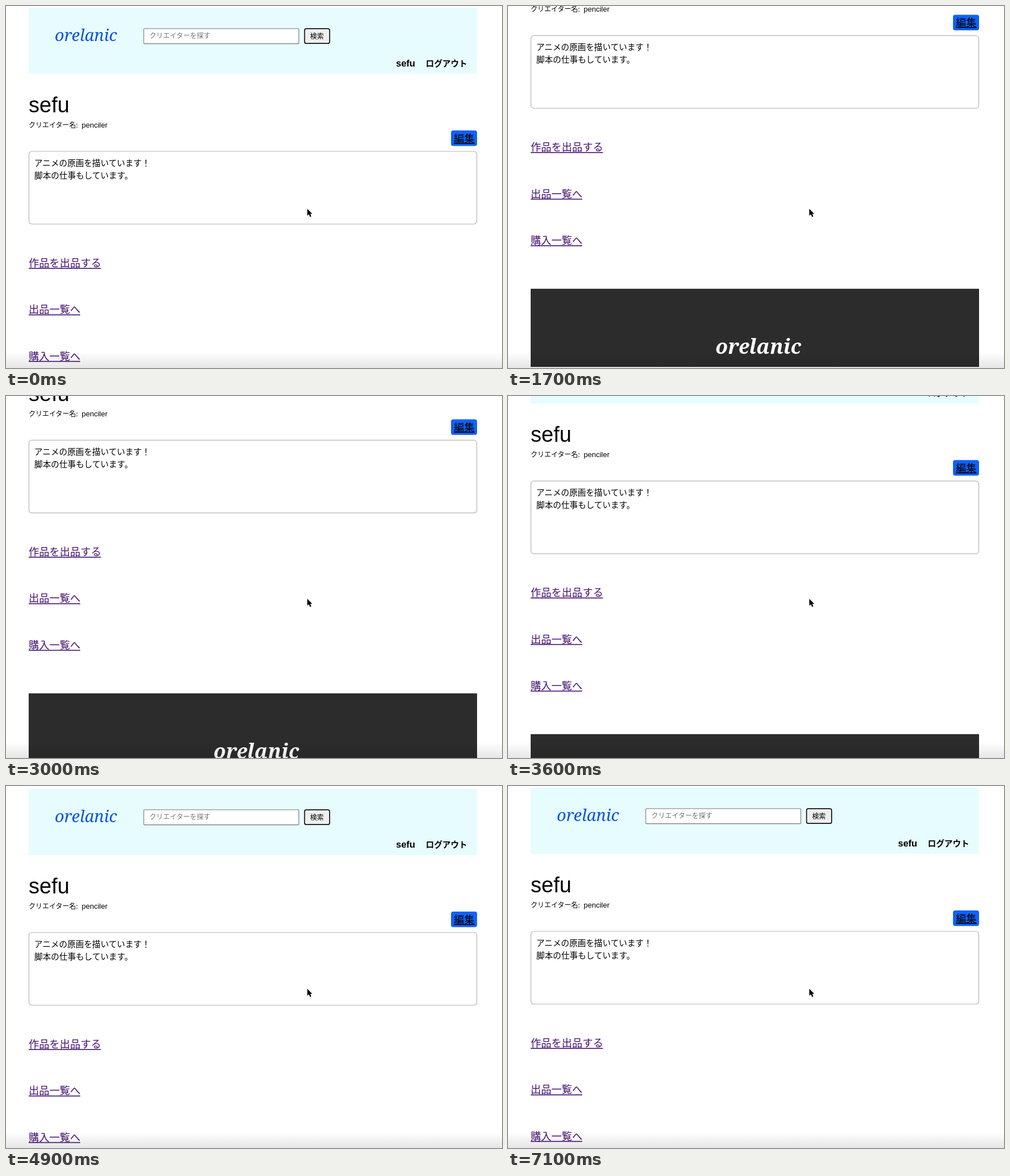
An HTML page that plays this animation: 875 px wide and 640 px high, repeating every 7.2 s.

```html
<!DOCTYPE html>
<html lang="ja">
<head>
<meta charset="utf-8">
<title>Profile page scroll</title>
<style>
  html, body { margin: 0; width: 100%; height: 100%; overflow: hidden; background: #fff; }
  svg { display: block; width: 875px; height: 640px; }
  text { font-family: "Noto Sans CJK JP", "Noto Sans CJK", sans-serif; font-size: 14.64px; white-space: pre; }
  .latin { font-family: "Liberation Sans", Arial, sans-serif; }
  .brand { font-family: "Noto Serif", serif; font-style: italic; }
  .small { font-size: 12px; }
  .nav { font-weight: 700; }
  .link { font-size: 18.3px; }
  .links { fill: #43106f; }
</style>
</head>
<body>
<svg viewBox="0 0 875 640">
  <defs>
    <linearGradient id="shade" x1="0" y1="0" x2="0" y2="1">
      <stop offset="0" stop-opacity="0"/>
      <stop offset="1" stop-opacity=".1"/>
    </linearGradient>
  </defs>

  <g id="page">
    <rect x="40" y="3" width="791" height="117" fill="#e7fcff"/>
    <text class="brand" x="86" y="62" style="font-size:29px" fill="#0b52e4">orelanic</text>
    <rect x="243" y="40" width="273.6" height="26.6" rx="1" fill="#fff" stroke="#767676" stroke-width="1.1"/>
    <text class="small" x="253" y="57" fill="#757575">クリエイターを探す</text>
    <rect x="526.7" y="40.2" width="44.2" height="26" rx="3" fill="#efefef" stroke="#111" stroke-width="1.7"/>
    <text class="small" x="536.5" y="57.5">検索</text>
    <text class="nav latin" x="688" y="107" style="font-size:16.5px">sefu</text>
    <text class="nav" x="740.5" y="107">ログアウト</text>

    <text class="latin" x="40" y="188" style="font-size:38px">sefu</text>
    <text class="small" x="40" y="215">クリエイター名:</text>
    <text class="small latin" x="133.5" y="215" style="font-size:13px">penciler</text>

    <rect x="785" y="220" width="46" height="27.5" rx="4" fill="#0f62fa"/>
    <text class="link" x="790" y="240.5">編集</text>
    <rect x="790" y="242" width="36.6" height="1.6"/>

    <rect x="40.5" y="257" width="790" height="128.5" rx="5" fill="#fff" stroke="#b5b5b5" stroke-width="1.2"/>
    <text x="50" y="282.7">アニメの原画を描いています！</text>
    <text x="50" y="304.7">脚本の仕事もしています。</text>

    <g class="links">
      <text class="link" x="40" y="461">作品を出品する</text>
      <rect x="40" y="463" width="127.5" height="1.6"/>
      <text class="link" x="40" y="543.3">出品一覧へ</text>
      <rect x="40" y="545.3" width="91" height="1.6"/>
      <text class="link" x="40" y="625.6">購入一覧へ</text>
      <rect x="40" y="627.6" width="91" height="1.6"/>
    </g>

    <rect x="40" y="704.5" width="791" height="138.2" fill="#2c2c2c"/>
    <text class="brand" x="366" y="819.5" style="font-size:35.5px;font-weight:600" fill="#fff">orelanic</text>
  </g>

  <rect y="612" width="875" height="28" fill="url(#shade)"/>
  <path transform="translate(531.5 358.5)" d="M0 0V12.3L2.8 9.7L4.9 14.4L7.1 13.4L5.1 8.9H8.8Z"
        stroke="#fff" stroke-width="1.2" stroke-linejoin="round" paint-order="stroke"/>
</svg>

<script>
  const LOOP = 7200, STEP = 100;
  const page = document.getElementById("page");

  // [time in ms, scroll offset in px], with a rubber-band bounce at both ends
  const keys = [
    [0, 0], [900, 0], [1200, 49.3], [1700, 204.6], [1800, 207], [2200, 203],
    [2700, 203], [3000, 178.8], [4000, 61.3], [4800, 1], [4900, -2],
    [5000, -4.2], [5500, 0], [LOOP, 0]
  ];

  const slope = i => {
    const a = keys[i], b = keys[i + 1];
    return a && b ? (b[1] - a[1]) / (b[0] - a[0]) : 0;
  };

  // Harmonic mean keeps the curve monotone and flat at turning points
  const tangent = i => {
    const a = slope(i - 1), b = slope(i);
    return a * b > 0 ? 2 * a * b / (a + b) : 0;
  };

  function scrollAt(t) {
    const i = keys.findIndex((k, n) => n && t < k[0]) - 1;
    const [t0, y0] = keys[i], [t1, y1] = keys[i + 1];
    const d = t1 - t0, u = (t - t0) / d, v = 1 - u;
    return y0 * (1 + 2 * u) * v * v + y1 * (3 - 2 * u) * u * u
      + d * u * v * (tangent(i) * v - tangent(i + 1) * u);
  }

  function draw(now) {
    const t = Math.floor(now % LOOP / STEP) * STEP;
    page.setAttribute("transform", `translate(0 ${-scrollAt(t).toFixed(2)})`);
    requestAnimationFrame(draw);
  }
  requestAnimationFrame(draw);
</script>
</body>
</html>
```
